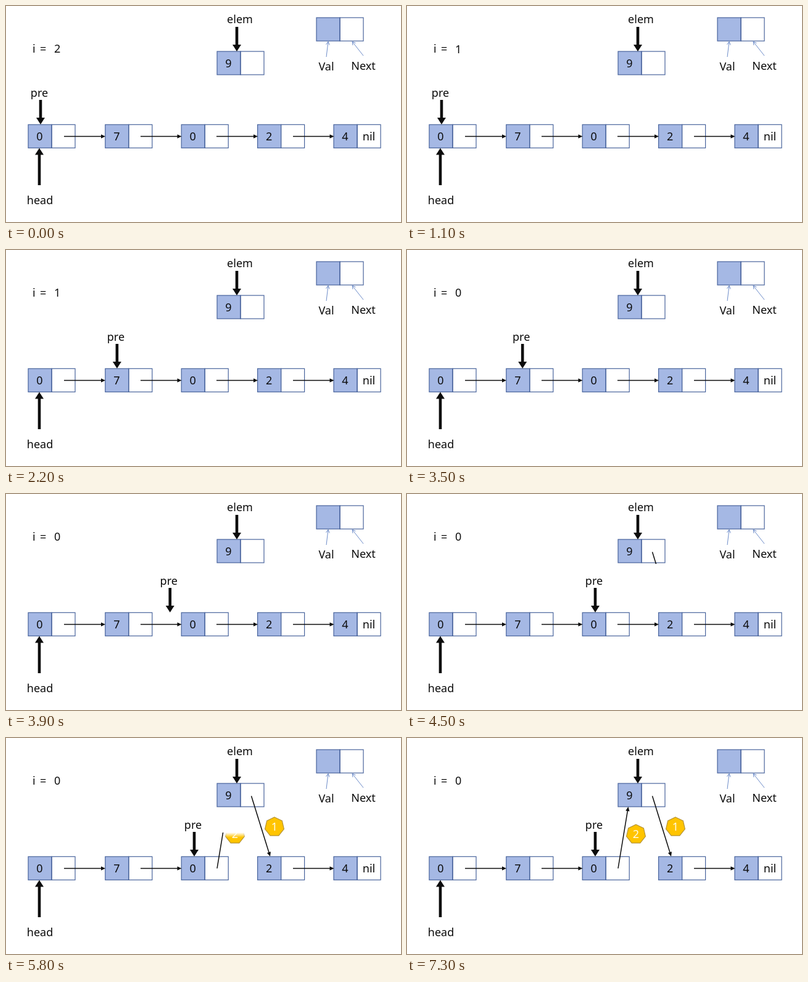
An HTML page with a canvas for the animation above (7.6 s loop, 640 px wide and 352 px high).

```html
<!DOCTYPE html>
<html lang="en">
<head>
<meta charset="utf-8">
<title>Linked list insertion</title>
<style>
html, body { margin: 0; width: 100%; height: 100%; overflow: hidden; background: #fff; }
canvas { display: block; width: 640px; height: 352px; }
</style>
</head>
<body>
<canvas id="stage" width="640" height="352"></canvas>
<script>
const LOOP = 7600, STEP = 100;
const INK = '#0c0c0c', FILL = '#a5b8e4', EDGE = '#48639c', LEGEND = '#6d8cc9';
const ctx = document.getElementById('stage').getContext('2d');

const progress = (t, start, length) => Math.min(1, Math.max(0, (t - start) / length));
const smooth = u => u < 0.5 ? 2 * u * u : 1 - 2 * (1 - u) ** 2;

function text(str, x, y, color = INK, align = 'center') {
  ctx.font = '18px "Noto Sans", "Open Sans", sans-serif';
  ctx.textAlign = align;
  ctx.fillStyle = color;
  ctx.fillText(str, x, y);
}

function polygon(points) {
  ctx.beginPath();
  points.forEach(([x, y]) => ctx.lineTo(x, y));
  ctx.closePath();
}

function line(x1, y1, x2, y2, width, color) {
  ctx.strokeStyle = color;
  ctx.lineWidth = width;
  ctx.beginPath();
  ctx.moveTo(x1, y1);
  ctx.lineTo(x2, y2);
  ctx.stroke();
}

// Arrow with a filled head of the given length and half width
function arrow(x1, y1, x2, y2, width, head, half, color = INK) {
  const a = Math.atan2(y2 - y1, x2 - x1), c = Math.cos(a), s = Math.sin(a);
  const bx = x2 - head * c, by = y2 - head * s;
  line(x1, y1, bx + c, by + s, width, color);
  ctx.fillStyle = color;
  polygon([[x2, y2], [bx - half * s, by + half * c], [bx + half * s, by - half * c]]);
  ctx.fill();
}

const link = (x1, y1, x2, y2) => arrow(x1, y1, x2, y2, 1.5, 7, 3.2);
const pointer = (x, y1, y2) => arrow(x, y1, x, y2, 4.6, 11, 7);

function legendArrow(x1, y1, x2, y2) {
  const a = Math.atan2(y2 - y1, x2 - x1);
  line(x1, y1, x2, y2, 1, LEGEND);
  for (const turn of [-0.5, 0.5])
    line(x2, y2, x2 - 6 * Math.cos(a + turn), y2 - 6 * Math.sin(a + turn), 1, LEGEND);
}

function node(x, y, val = '', next = '') {
  ctx.fillStyle = FILL;
  ctx.fillRect(x, y, 38, 38);
  ctx.fillStyle = '#fff';
  ctx.fillRect(x + 38, y, 38, 38);
  ctx.strokeStyle = EDGE;
  ctx.lineWidth = 1.2;
  ctx.strokeRect(x, y, 38, 38);
  ctx.strokeRect(x + 38, y, 38, 38);
  text(val, x + 18.5, y + 26);
  text(next, x + 57, y + 26);
}

function clipped(x, y, w, h, draw) {
  if (w <= 0 || h <= 0) return;
  ctx.save();
  ctx.beginPath();
  ctx.rect(x, y, w, h);
  ctx.clip();
  draw();
  ctx.restore();
}

// Heptagon revealed from the bottom up with a soft edge
function badge(label, x, y, u) {
  if (u <= 0) return;
  const r = 15.8, points = [];
  for (let k = 0; k < 7; k++) {
    const a = k * 2 * Math.PI / 7 - Math.PI / 2;
    points.push([x + r * Math.cos(a), y + 0.8 + r * Math.sin(a)]);
  }
  polygon(points);
  ctx.fillStyle = '#ffc400';
  ctx.fill();
  ctx.strokeStyle = '#b69434';
  ctx.lineWidth = 1.2;
  ctx.stroke();
  text(label, x, y + 6.5, '#fffbe8');
  if (u >= 1) return;
  const top = y - 17, edge = y + 16 - 31 * u;
  const veil = ctx.createLinearGradient(0, edge, 0, edge + 8);
  veil.addColorStop(0, '#fff');
  veil.addColorStop(1, 'rgba(255,255,255,0)');
  ctx.fillStyle = veil;
  ctx.fillRect(x - 18, top, 36, edge + 8 - top);
}

// One counter value: floats in from below, later fades upward
function digit(value, t, enter, leave, y) {
  const come = progress(t, enter, 600), go = progress(t, leave, 450);
  ctx.globalAlpha = Math.min(1, come * 1.3) * (1 - go);
  text(value, 83.2, y + 35 * (1 - come) ** 2 - 8 * go * go);
  ctx.globalAlpha = 1;
}

function render(t) {
  ctx.fillStyle = '#fff';
  ctx.fillRect(0, 0, 640, 352);

  text('i', 43, 76, INK, 'left');
  text('=', 55, 76, INK, 'left');
  digit('2', t, -1000, 350, 75.7);
  digit('1', t, 600, 2350, 75.7);
  digit('0', t, 2600, LOOP, 76.3);

  node(503, 19);
  legendArrow(519, 83, 522, 58);
  legendArrow(579, 81, 561, 58);
  text('Val', 519, 104.5);
  text('Next', 579, 104);

  badge('1', 435, 144, progress(t, 4500, 500));
  badge('2', 371, 156, progress(t, 5510, 500));

  node(342, 74, '9');
  text('elem', 379, 27.5);
  pointer(374, 34, 74);

  ['0', '7', '0', '2', '4'].forEach((val, k) =>
    node(k ? 160.8 + (k - 1) * 123.4 : 36, 193.3, val, k === 4 ? 'nil' : ''));
  link(94, 212.5, 161, 212.5);
  link(218, 212.5, 284.5, 212.5);
  link(465, 212.5, 531.5, 212.5);

  const gone = progress(t, 5000, 500);
  clipped(340, 205, 69 * (1 - gone), 15, () => link(341, 212.5, 408, 212.5));
  const first = progress(t, 4400, 500);
  clipped(390, 94, 45, 100 * first, () => link(397.5, 94.5, 428, 193));
  const second = progress(t, 5510, 500);
  clipped(335, 212.5 - 101 * second, 35, 102 * second, () => link(342, 212.5, 358.5, 112));

  const shift = 125 * smooth(progress(t, 1360, 900)) + 124 * smooth(progress(t, 3358, 900));
  text('pre', 54 + shift, 147.5);
  pointer(56 + shift, 153, 193);

  pointer(54, 292, 231.5);
  text('head', 55, 323);
}

const begin = performance.now();
function tick() {
  const t = (performance.now() - begin) % LOOP;
  render(Math.floor(t / STEP) * STEP);
  requestAnimationFrame(tick);
}
tick();
</script>
</body>
</html>
```
